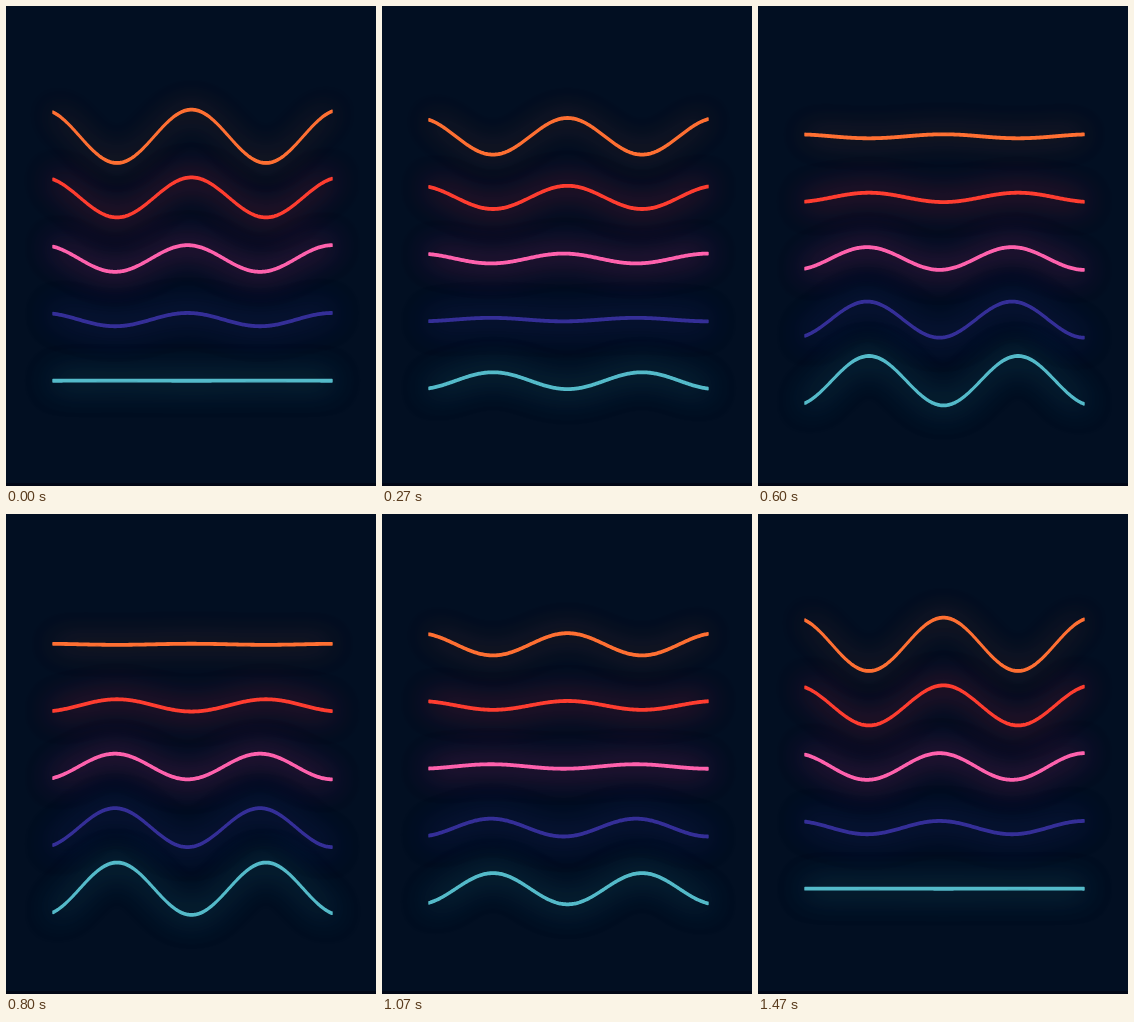
These frames come from a looping animation (370x480 px, 1.54 s). An HTML page with a canvas:

```html
<!DOCTYPE html>
<html lang="en">
<head>
<meta charset="utf-8">
<title>Neon waves</title>
<style>
  html, body { margin: 0; height: 100%; overflow: hidden; background: #020f22; }
  canvas { display: block; }
</style>
</head>
<body>
<canvas id="stage" width="370" height="480"></canvas>
<script>
const ctx = document.getElementById("stage").getContext("2d");
const LOOP = 1540, SWING = 1500, LEAD = 18;
const LEFT = 47, RIGHT = 326, AMP = 26.7;
const FIRST_Y = 130.3, GAP = 61.1, HALF = 1.2;

// Each wave crests at `crest` and repeats every `period` pixels.
const waves = [
  { color: "#ff7033", glow: "#ff703370", crest: 185.5, period: 149 },
  { color: "#ff3e30", glow: "#ff2850c0", crest: 185.5, period: 149 },
  { color: "#ff63ae", glow: "#ff309ac0", crest: 181.5, period: 145 },
  { color: "#352f98", glow: "#3c32b0b0", crest: 181.5, period: 145 },
  { color: "#55bbca", glow: "#40b8c490", crest: 185.5, period: 149 }
];

function drawWave({ color, glow, crest, period }, y, amp) {
  const at = x => y - amp * Math.cos((x - crest) / period * 2 * Math.PI);
  ctx.beginPath();
  for (let x = LEFT; x <= RIGHT; x++) ctx.lineTo(x, at(x) - HALF);
  for (let x = RIGHT; x >= LEFT; x--) ctx.lineTo(x, at(x) + HALF);
  ctx.closePath();
  ctx.fillStyle = ctx.strokeStyle = color;
  ctx.shadowColor = glow;
  ctx.fill();
  ctx.stroke();
}

function draw(now) {
  // Motion advances in 15 steps per second.
  const step = Math.min(22, Math.floor((now % LOOP + 4) * 0.015));
  const time = step / 0.015 + LEAD;
  const swing = (1 - Math.cos(time / SWING * 2 * Math.PI)) / 2;

  ctx.shadowColor = "transparent";
  ctx.fillStyle = "#020f22";
  ctx.fillRect(0, 0, 370, 480);
  ctx.fillStyle = "#010716";
  ctx.fillRect(0, 477, 370, 3);

  ctx.lineWidth = 1.4;
  ctx.lineJoin = "round";
  ctx.shadowBlur = 30;
  waves.forEach((wave, i) =>
    drawWave(wave, FIRST_Y + i * GAP, AMP * (1 - i / 4 - swing)));
}

const start = performance.now();
function tick() {
  draw(performance.now() - start);
  requestAnimationFrame(tick);
}
tick();
</script>
</body>
</html>
```
